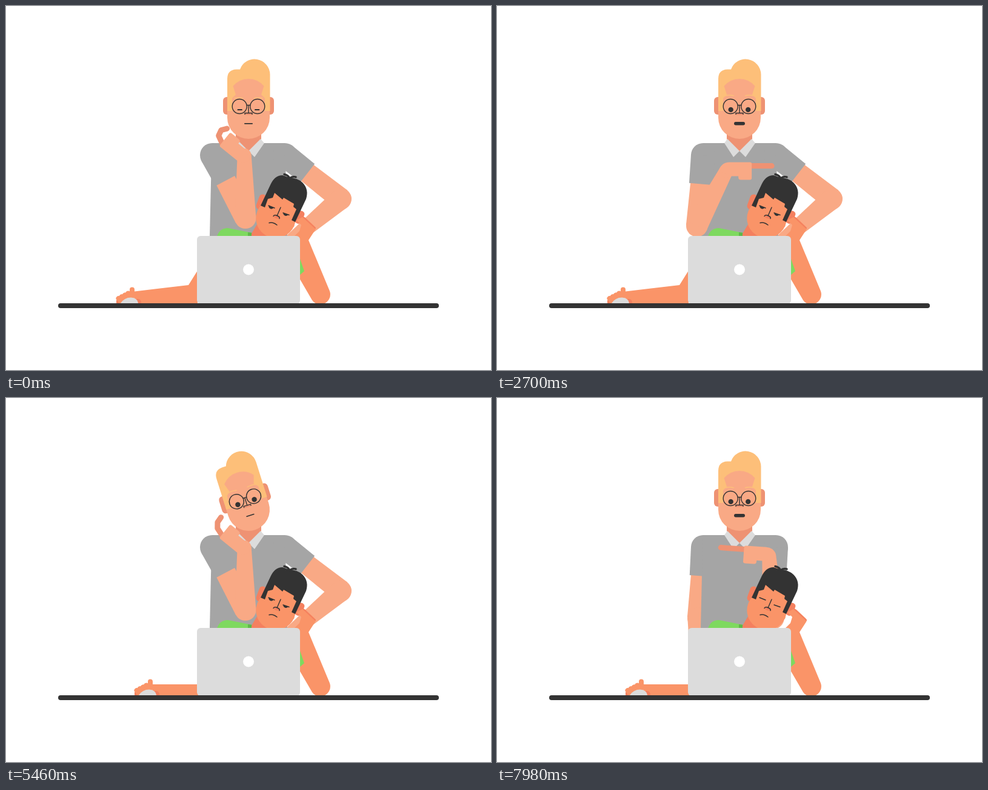
Recreate the animation shown at these times as an HTML page. Size 800 px wide and 600 px high, loop 8 s.

```html
<!DOCTYPE html>
<html lang="en">
<head>
<meta charset="utf-8">
<title>Watching over</title>
<style>
  html, body { margin: 0; width: 100%; height: 100%; overflow: hidden; background: #fff; }
  svg { display: block; width: 100%; height: 100%; }
  .skin { fill: #f9a985; } .shade { fill: #ee9273; }
  .kid { fill: #fa9468; } .kidshade { fill: #f4805f; }
  .shirt { fill: #a5a5a5; } .light { fill: #dcdcdc; }
  .hair { fill: #fdbf79; } .ink { fill: #333; }
  .line { fill: none; stroke: #333; stroke-width: 1.4; stroke-linecap: round; stroke-linejoin: round; }
  .finger { fill: none; stroke: #ee9273; stroke-width: 9; stroke-linecap: round; stroke-linejoin: round; }
  .toe { stroke: #fa9468; stroke-width: 8; stroke-linecap: round; }
</style>
</head>
<body>
<svg viewBox="0 0 800 600">
  <clipPath id="aboveDesk"><rect width="800" height="490"/></clipPath>
  <g clip-path="url(#aboveDesk)">
    <g id="armBack"></g>
    <path class="shirt" d="M340 226H460L462 292 464 380H336L338 292Z"/>
    <path class="shade" d="M379 200H421V220L400 240 379 220Z"/>
    <path class="light" d="M380 219L375 226 390 249 400 239ZM420 219L426 226 410 249 400 239Z"/>
    <g id="armRight" transform="translate(800) scale(-1 1)"></g>
    <g id="armFront"></g>
  </g>

  <g id="head">
    <rect class="shade" x="358" y="150" width="16" height="29" rx="6"/>
    <rect class="shade" x="426" y="150" width="16" height="29" rx="6"/>
    <path class="skin" d="M372 116H428V150H435V184A35 35 0 0 1 365 184V150H372Z"/>
    <path class="hair" d="M365 173V120Q365 105 380 104.500H386A25.500 25.500 0 0 1 435.500 113V173H427V152L421 146 425.500 132Q415 120 400 120T374.500 132L379 146 373 152V173Z"/>
    <path id="brows" d="M376 148Q383 146 391 148M409 148Q417 146 424 148" fill="none" stroke="#fdbf79" stroke-width="1.500"/>
    <path class="shade" d="M394 179.500V176.500H406V179.500Z"/>
    <g id="eyes"></g>
    <g class="line">
      <circle cx="385.200" cy="165.500" r="12"/>
      <circle cx="414.800" cy="165.500" r="12"/>
      <path d="M397.200 163.500H402.800M400 163.500V176.500M394 178.500V176.500H406V178.500"/>
    </g>
    <rect id="mouth" class="ink"/>
  </g>

  <g id="leg"></g>

  <path d="M348 380Q352 366 366 366L406 374V380Z" fill="#7ed95f"/>
  <path d="M399 373L406 374V380H399Z" fill="#5eb84a"/>
  <path class="kidshade" d="M414 360L405 375V380H440Z"/>
  <rect class="kidshade" x="415" y="310" width="12" height="26" rx="6" transform="rotate(20 421 323)"/>
  <rect class="kidshade" x="479" y="337" width="11" height="22" rx="5" transform="rotate(25 484 348)"/>
  <path class="kid" d="M420 329L445 300 485 320 475 364 445 370Z"/>
  <circle class="kid" cx="445" cy="350" r="32.700"/>
  <path class="ink" d="M420 329L436 295Q443 279 456 279L468 283Q480 283 489 291 500 302 495 318L477 356 471 353 479 335 474 331 475 326 458 316 456 319 443 308 440 316 432 318 427 332Z"/>
  <path d="M459 277.500Q465 278.500 468 284Q472 280.500 478 282" fill="none" stroke="#333" stroke-width="3.500" stroke-linecap="round"/>
  <path class="kidshade" d="M441 347Q443 344 448 346T451 350Q446 352 441 347Z"/>
  <path class="line" d="M453 332L447 346M441 346.500Q442 344 446 345L449 346.500Q452 348 451 350.500M434 357.500Q440 355.500 447 361M433 329L443 333M457 341L467 344.500"/>
  <path id="lids" class="ink" d="M433.500 329.500L441.500 332.500Q439 335.500 436 334T433.500 329.500ZM457.500 341.200L465.500 344Q463 347 460 345.500T457.500 341.200Z"/>
  <path class="kid" d="M479 353L489 348Q491 346.500 494 349L509 363Q512 366 510 369L499 386 534 470A16.500 16.500 0 0 1 505 485L480 442V400L475 380 484 371 487 361Z"/>
  <path d="M490 347.500L510 366" stroke="#f4805f" stroke-width="2" stroke-linecap="round"/>
  <path d="M484 414L492 437 484 444Z" fill="#7ed95f"/>

  <rect class="light" x="315" y="379" width="170" height="112" rx="6"/>
  <circle cx="400" cy="434.500" r="9" fill="#fff"/>
  <rect class="ink" x="86" y="490" width="628" height="8" rx="4"/>
</svg>
<script>
const LOOP = 8000, CYCLE = 4640, LAG = 40;
const $ = id => document.getElementById(id);

// angles of upper arm, forearm and bent wrist; the right arm is mirrored
const CHIN = [62, -91, -50], RAISED = [90, -101, -29], POINT = [95, -62, 62], PULL = [88, -86, 82];
const HIP = [142, 40, 75], DROP = [104, 115, 115], SWING = [112, 82, 0], HANG = [94, 90, 0];

const blend = (t, from, to) => {
  const x = Math.min(1, Math.max(0, (t - from) / (to - from)));
  return x * x * (3 - 2 * x);
};
const pulse = (t, a, b, c, d) => blend(t, a, b) - blend(t, c, d);
const wave = (t, period) => Math.cos(t / period * 2 * Math.PI);

// each joint follows the one before it a little later
const pose = (t, rest, moves) => rest.map((angle, joint) =>
  moves.reduce((v, [from, to, goal]) => v + (goal[joint] - v) * blend(t - joint * LAG, from, to), angle));

const leftPose = t => pose(t, CHIN, [
  [1480, 1980, RAISED], [2130, 2420, POINT], [2900, 3280, PULL],
  [3650, 4150, CHIN], [6150, 6480, SWING], [6480, 6740, HANG]
]);
const rightPose = t => pose(t, HIP, [[6060, 6440, DROP], [6440, 6660, RAISED], [7320, 7620, PULL]]);

const polar = ([x, y], deg, r) => {
  const a = deg * Math.PI / 180;
  return [x + r * Math.cos(a), y + r * Math.sin(a)];
};

// tapered bar with half width w0 at p and w1 at its far end
function bar(p, a, len, w0, w1, cls) {
  const q = polar(p, a, len);
  const pts = [polar(p, a - 90, w0), polar(q, a - 90, w1), polar(q, a + 90, w1), polar(p, a + 90, w0)];
  return `<polygon class="${cls}" points="${pts.join(' ')}"/>`;
}
const dot = (p, r, cls) => `<circle class="${cls}" cx="${p[0]}" cy="${p[1]}" r="${r}"/>`;

function arm([up, fore, bend], curl, reach) {
  const shoulder = [340, 246], elbow = polar(shoulder, up, 117), wrist = polar(elbow, fore, 103);
  let tip = [40, -8], turn = 0, finger = 'M' + tip;
  for (let i = 0; i < 3; i++) {
    turn += (i ? 50 : 26) * curl;
    tip = polar(tip, turn, (i ? 10 : 15) * reach);
    finger += 'L' + tip;
  }
  return bar(shoulder, up, 117, 16, 18, 'skin') + dot(elbow, 17.8, 'skin')
    + dot(shoulder, 20, 'shirt') + bar(shoulder, up, 47.5, 20, 19, 'shirt')
    + bar(elbow, fore, 103, 17.5, 11.5, 'skin') + dot(wrist, 11.5, 'skin')
    + `<g transform="translate(${wrist}) rotate(${fore + bend})">`
    + (reach > 0.02 ? `<path class="finger" d="${finger}"/>` : '')
    + '<path class="skin" d="M-11 2Q-10-14 6-14H39Q42-14 42-11V12Q42 15 39 15H24Q20 15 20 11V9H8Z"/></g>';
}

function leg(t) {
  const k = blend(t, 3450, 3900);
  const press = t > 4080 && t < 4920 ? 2 - 2 * wave(t - 4080, 420) : 0;
  let toes = '';
  for (let i = 0; i < 4; i++) {
    const x = 185.5 + 5.3 * i, y = 482 - 2.8 * i;
    toes += `<path class="toe" d="M${x} ${y}l4 ${5 + i}"/>`;
  }
  return `<path class="kid" d="M${212 + 30 * k} ${470.5 + 1.5 * k}L${301 + 35 * k} ${460 + 12 * k} ${316 + 30 * k} 436V490H${212 + 30 * k}Z"/>`
    + `<g transform="translate(${30 * k})">`
    + '<path class="kidshade" d="M214 490V483Q223 481 223 490ZM182 490V485H192V490Z"/>'
    + toes + `<path class="toe" d="M208 ${467.5 + press}V480"/>`
    + '<path class="light" d="M189 490Q195 480.5 206 480.5Q217 481 218 490Z"/></g>';
}

function drawFace(t) {
  const tilt = -17.5 * pulse(t % CYCLE, 80, 640, 1620, 2020);
  $('head').setAttribute('transform', `rotate(${tilt} 400 184)`);

  const open = blend(t, 1470, 1560), h = 2 + 6.4 * open;
  $('eyes').innerHTML = [385.7, 414.2].map(x =>
    `<rect class="ink" x="${x - 4.2}" y="${170.9 - h / 2}" width="8.4" height="${h}" rx="${h / 2}"/>`).join('');
  $('brows').setAttribute('transform', `translate(0 ${4 - 4 * open})`);

  const talking = (t > 2430 && t < 3480) || t > 7370;
  const gape = talking ? 0.5 + 0.5 * wave(t - 2700, 264) : 0;
  const width = 14 + 4 * gape, height = 1.7 + 3.8 * gape;
  const box = { x: 400 - width / 2, y: 193.8 - height / 2, width, height, rx: height / 2 };
  for (const name in box) $('mouth').setAttribute(name, box[name]);
}

function draw(t) {
  const curl = (1 - pulse(t, 1880, 2400, 3700, 4200)) * (0.83 + 0.17 * wave(t, 516));
  const left = arm(leftPose(t), curl, 1);
  const hanging = t > 6450;
  $('armBack').innerHTML = hanging ? left : '';
  $('armFront').innerHTML = hanging ? '' : left;
  $('armRight').innerHTML = arm(rightPose(t), 0, 1.15 * blend(t, 7320, 7620));
  $('leg').innerHTML = leg(t);
  drawFace(t);

  const phase = t % 1000;
  $('lids').style.display = phase > 890 && phase < 990 ? 'none' : '';
}

const start = performance.now();
function frame() {
  draw((performance.now() - start) % LOOP);
  requestAnimationFrame(frame);
}
frame();
</script>
</body>
</html>
```
